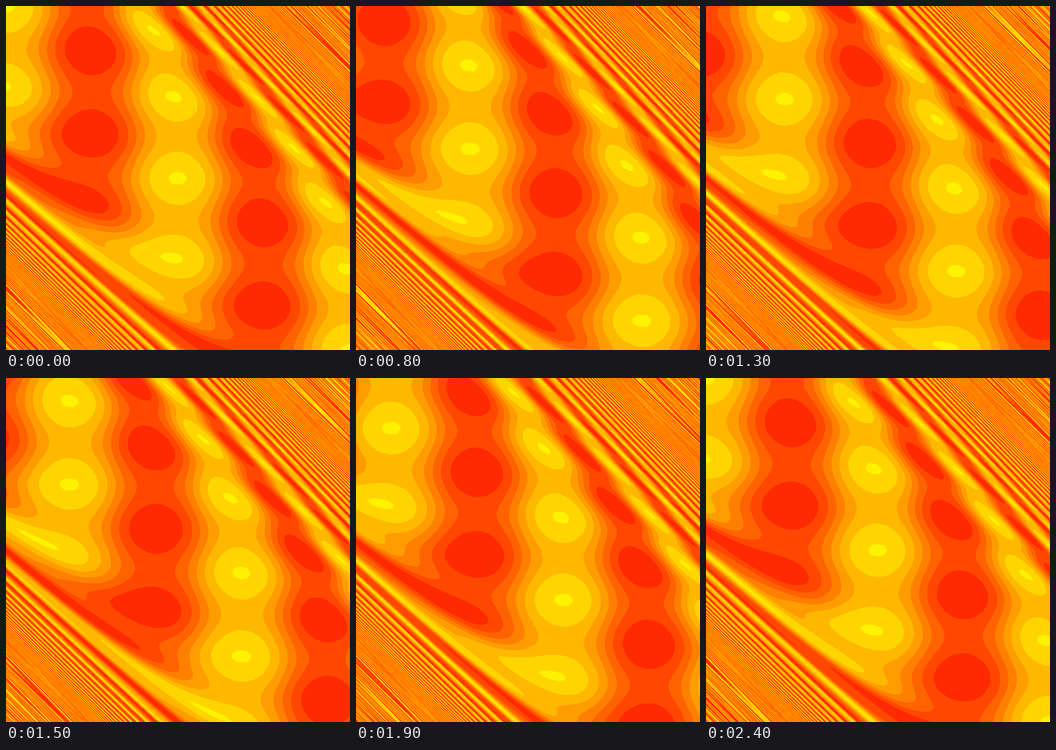
An HTML page without scripts that plays this animation: 600x600 px, repeating every 2500 ms.

```html
<!DOCTYPE html>
<html lang="en">
<head>
<meta charset="utf-8">
<title>Plasma</title>
<style>
@property --t { syntax: "<length>"; inherits: false; initial-value: 0px; }

html, body { margin: 0; width: 100%; height: 100%; overflow: hidden; background: #ff9d00; }
svg { display: block; width: 100vw; height: 100vh; }

/* Two waves slide along the diagonal in opposite directions. */
.wave {
  transform: translateX(calc(var(--sign) * var(--t)));
  animation: slide 2.5s steps(25) infinite;
}
.columns { --sign: -1; --slant: 0; fill: url(#broad); }
.rows { --sign: 1; --slant: 1; fill: url(#narrow); opacity: .2156; }
@keyframes slide { to { --t: 312.5px; } }

/* Each strip is one pixel diagonal, its phase pushed exponentially by x - y. */
.strip {
  --d: calc(var(--i) + 10 * var(--j) + 100 * var(--k) - 600);
  --grow: exp(var(--d) * pi / 150);
  --push: calc(1.5 / pi * (var(--sign) * var(--grow) - 1 / var(--grow)));
  transform: translate(
    calc(1px * mod(.5 + var(--push) + var(--slant) * var(--d), 300)),
    calc(-1px * var(--d)));
}

#broad stop {
  stop-color: rgb(0 calc(113.5 + 120 * cos(180deg * var(--a)) - 6.5 * cos(540deg * var(--a))) 0);
}
#narrow stop {
  stop-color: rgb(0 calc(113.5 + 113.5 * cos(180deg * var(--a))) 0);
}
</style>
</head>
<body>
<svg viewBox="0 0 600 600" shape-rendering="crispEdges">
  <defs>
    <linearGradient id="broad" gradientUnits="userSpaceOnUse" x1="0" x2="150" y1="0" y2="0" spreadMethod="reflect">
      <stop offset="0" style="--a:0"/>
      <stop offset=".05" style="--a:.05"/>
      <stop offset=".1" style="--a:.1"/>
      <stop offset=".15" style="--a:.15"/>
      <stop offset=".2" style="--a:.2"/>
      <stop offset=".25" style="--a:.25"/>
      <stop offset=".3" style="--a:.3"/>
      <stop offset=".35" style="--a:.35"/>
      <stop offset=".4" style="--a:.4"/>
      <stop offset=".45" style="--a:.45"/>
      <stop offset=".5" style="--a:.5"/>
      <stop offset=".55" style="--a:.55"/>
      <stop offset=".6" style="--a:.6"/>
      <stop offset=".65" style="--a:.65"/>
      <stop offset=".7" style="--a:.7"/>
      <stop offset=".75" style="--a:.75"/>
      <stop offset=".8" style="--a:.8"/>
      <stop offset=".85" style="--a:.85"/>
      <stop offset=".9" style="--a:.9"/>
      <stop offset=".95" style="--a:.95"/>
      <stop offset="1" style="--a:1"/>
    </linearGradient>
    <linearGradient id="narrow" gradientUnits="userSpaceOnUse" x1="0" x2="75" y1="0" y2="0" spreadMethod="reflect">
      <stop offset="0" style="--a:0"/>
      <stop offset=".1" style="--a:.1"/>
      <stop offset=".2" style="--a:.2"/>
      <stop offset=".3" style="--a:.3"/>
      <stop offset=".4" style="--a:.4"/>
      <stop offset=".5" style="--a:.5"/>
      <stop offset=".6" style="--a:.6"/>
      <stop offset=".7" style="--a:.7"/>
      <stop offset=".8" style="--a:.8"/>
      <stop offset=".9" style="--a:.9"/>
      <stop offset="1" style="--a:1"/>
    </linearGradient>

    <!-- Eight flat bands from red to yellow -->
    <filter id="bands" filterUnits="userSpaceOnUse" x="0" y="0" width="600" height="600" color-interpolation-filters="sRGB">
      <feComponentTransfer>
        <feFuncR type="discrete" tableValues="1"/>
        <feFuncG type="discrete" tableValues=".165 .28 .392 .502 .616 .725 .839 .95"/>
        <feFuncB type="discrete" tableValues="0"/>
      </feComponentTransfer>
    </filter>

    <rect id="strip" class="strip" x="-620" y="-.5" width="1540" height="1"/>
    <g id="ten">
      <use href="#strip" style="--i:0"/>
      <use href="#strip" style="--i:1"/>
      <use href="#strip" style="--i:2"/>
      <use href="#strip" style="--i:3"/>
      <use href="#strip" style="--i:4"/>
      <use href="#strip" style="--i:5"/>
      <use href="#strip" style="--i:6"/>
      <use href="#strip" style="--i:7"/>
      <use href="#strip" style="--i:8"/>
      <use href="#strip" style="--i:9"/>
    </g>
    <g id="hundred">
      <use href="#ten" style="--j:0"/>
      <use href="#ten" style="--j:1"/>
      <use href="#ten" style="--j:2"/>
      <use href="#ten" style="--j:3"/>
      <use href="#ten" style="--j:4"/>
      <use href="#ten" style="--j:5"/>
      <use href="#ten" style="--j:6"/>
      <use href="#ten" style="--j:7"/>
      <use href="#ten" style="--j:8"/>
      <use href="#ten" style="--j:9"/>
    </g>
    <g id="all">
      <use href="#hundred" style="--k:0"/>
      <use href="#hundred" style="--k:1"/>
      <use href="#hundred" style="--k:2"/>
      <use href="#hundred" style="--k:3"/>
      <use href="#hundred" style="--k:4"/>
      <use href="#hundred" style="--k:5"/>
      <use href="#hundred" style="--k:6"/>
      <use href="#hundred" style="--k:7"/>
      <use href="#hundred" style="--k:8"/>
      <use href="#hundred" style="--k:9"/>
      <use href="#hundred" style="--k:10"/>
      <use href="#hundred" style="--k:11"/>
    </g>
  </defs>

  <g filter="url(#bands)">
    <g transform="matrix(1 1 0 1 0 0)">
      <g class="wave columns"><use href="#all"/></g>
      <g class="wave rows"><use href="#all"/></g>
    </g>
  </g>
</svg>
</body>
</html>
```
